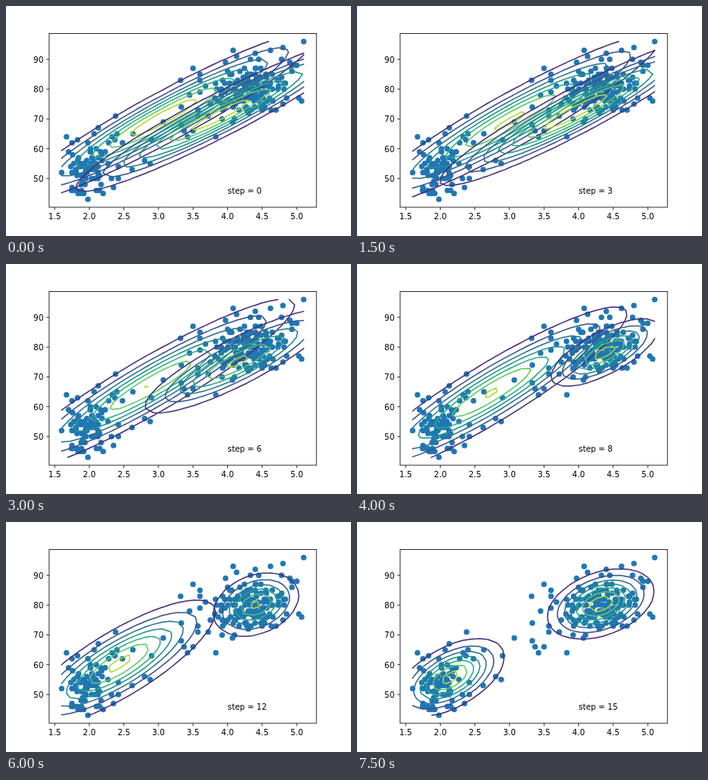
Animation of 432 by 288 pixels, one loop 8 s. Source, as an HTML page:

```html
<!DOCTYPE html>
<html lang="en">
<head>
<meta charset="utf-8">
<title>Mixture fit</title>
<style>
  html, body { margin: 0; width: 100%; height: 100%; overflow: hidden; background: #fff; }
  svg { display: block; width: 432px; height: 288px; }
  text { font: 10px "DejaVu Sans", sans-serif; fill: #000; }
  .dots { fill: #1f77b4; }
  .lines { fill: none; stroke-width: 1.5; stroke-linecap: round; stroke-linejoin: round; }
  .axes { fill: none; stroke: #000; stroke-width: .8; }
</style>
</head>
<body>
<svg viewBox="0 0 432 288">
  <g class="dots"></g>
  <g class="lines"></g>
  <g class="axes"><rect x="54" y="34.56" width="334.8" height="217.44"/></g>
  <g class="labels"></g>
</svg>
<script>
const STEPS = 16, STEP_MS = 500, GRID = 30;
const X0 = 1.6, X1 = 5.1, Y0 = 43, Y1 = 96;
const px = x => 61 + (x - 1.5) * 86.6;
const py = y => 216 - (y - 50) * 3.73;

const $ = s => document.querySelector(s);
function add(parent, tag, attrs, text) {
  const el = document.createElementNS('http://www.w3.org/2000/svg', tag);
  for (const k in attrs) el.setAttribute(k, attrs[k]);
  if (text !== undefined) el.textContent = text;
  parent.appendChild(el);
  return el;
}

// Axes
const axes = $('.axes'), labels = $('.labels');
for (let v = 1.5; v <= 5; v += 0.5) {
  add(axes, 'path', { d: `M${px(v)} 252v3.5` });
  add(labels, 'text', { x: px(v), y: 266.6, 'text-anchor': 'middle' }, v.toFixed(1));
}
for (let v = 50; v <= 90; v += 10) {
  add(axes, 'path', { d: `M54 ${py(v)}h-3.5` });
  add(labels, 'text', { x: 47, y: py(v) + 3.8, 'text-anchor': 'end' }, v);
}
const caption = add(labels, 'text', { x: px(4), y: py(45) }, '');

// Outlying points by hand, dense cores from a seeded generator
const outer = [
  [1.6,52],[1.67,64],[1.7,59],[1.75,47],[1.75,62],[1.82,46],[1.83,63],[1.92,45],[1.98,43],[2.15,46],
  [2.2,45],[2.35,47],[2.17,48],[2.32,50],[2.42,50],[2.42,54],[2.62,53],[2.8,56],[2.88,55],[2.9,63],
  [2.63,65],[2.48,62],[2.4,65],[2.37,63],[2.33,64],[2.38,71],[2.13,67],[2.07,65],[1.98,62],[2.28,62],
  [2.27,55],[2.23,59],[3.07,69],[3.33,74],[3.32,83],[3.33,68],[3.37,66],[3.42,64],[3.5,66],[3.45,78],
  [3.5,87],[3.6,85],[3.6,83],[3.6,79],[3.57,73],[3.57,71],[3.72,71],[3.83,64],[3.68,81],[3.75,75],
  [3.92,70],[4.07,69],[4.1,70],[4.3,72],[4.5,73],[4.7,73],[4.8,75],[5.07,76],[5.03,77],[5.1,96],
  [5,88],[4.93,88],[4.9,89],[4.8,94],[4.62,93],[4.4,92],[4.33,90],[4.45,90],[4.08,93],[4.13,91],
  [3.97,89],[4,86],[4.78,90],[4.93,86]
];
let seed = 11;
function rnd() {
  seed = (seed * 16807) % 2147483647;
  return seed / 2147483647;
}
const gauss = () => Math.sqrt(-2 * Math.log(rnd())) * Math.cos(2 * Math.PI * rnd());
function core(count, mx, sx, my, sy, slope, [xa, xb, ya, yb]) {
  const out = [];
  while (out.length < count) {
    const x = mx + sx * gauss();
    const y = Math.round(my + slope * (x - mx) + sy * gauss());
    if (x > xa && x < xb && y >= ya && y <= yb) out.push([x, y]);
  }
  return out;
}
const points = [
  ...outer,
  ...core(62, 1.95, 0.15, 53.5, 4.6, 6, [1.73, 2.27, 45, 61]),
  ...core(125, 4.34, 0.3, 79.6, 4.3, 3, [3.73, 4.92, 73, 88])
];
for (const [x, y] of points) add($('.dots'), 'circle', { cx: px(x), cy: py(y), r: 3.5 });

// Two components at key steps: mean x, mean y, spread in x, ridge slope, spread about the ridge
const keys = [0, 3, 5, 8, 10, 12, 15];
const low = [
  [3.07, 70.4, 1.1, 12.3, 4.64],
  [3.01, 69.3, 1.09, 12.6, 5.05],
  [2.97, 68.5, 1.08, 12.7, 5.2],
  [2.74, 64.8, 0.99, 13.5, 5.64],
  [2.56, 62.1, 0.884, 13.3, 5.8],
  [2.43, 60.3, 0.7, 12.5, 6.25],
  [2.14, 55.7, 0.39, 9, 5.5]
];
const high = [
  [3.9, 71.4, 1.04, 11.7, 3.97],
  [3.96, 72.5, 0.97, 11.9, 4.15],
  [4.05, 73.8, 0.86, 11.5, 4.7],
  [4.38, 78.2, 0.4, 10.5, 4.06],
  [4.41, 79.8, 0.33, 5.5, 5.1],
  [4.41, 80.2, 0.32, 5, 5.3],
  [4.32, 80.4, 0.378, 5.6, 5.4]
];
function paramsAt(table, step) {
  let i = 0;
  while (i < keys.length - 2 && step > keys[i + 1]) i++;
  const u = (step - keys[i]) / (keys[i + 1] - keys[i]);
  return table[i].map((a, k) => a + (table[i + 1][k] - a) * u);
}

const viridis = ['440154', '472d7b', '3b528b', '2c728e', '21918c', '28ae80', '5ec962', 'addc30', 'fde725']
  .map(h => [0, 2, 4].map(i => parseInt(h.slice(i, i + 2), 16)));
function colour(t) {
  const i = Math.min(7, Math.floor(t * 8)), u = t * 8 - i;
  return `rgb(${viridis[i].map((a, k) => Math.round(a + (viridis[i + 1][k] - a) * u))})`;
}

function niceStep(raw) {
  const base = 10 ** Math.floor(Math.log10(raw));
  return base * [1, 1.5, 2, 2.5, 3, 4, 5, 6, 8, 10].find(m => m * base >= raw);
}

const gx = i => X0 + (X1 - X0) * i / (GRID - 1);
const gy = j => Y0 + (Y1 - Y0) * j / (GRID - 1);

// Marching squares over the grid for one level
function trace(z, level) {
  let d = '';
  for (let j = 0; j < GRID - 1; j++) {
    for (let i = 0; i < GRID - 1; i++) {
      const c = [[i, j], [i + 1, j], [i + 1, j + 1], [i, j + 1]];
      const hits = [];
      for (let k = 0; k < 4; k++) {
        const [ai, aj] = c[k], [bi, bj] = c[(k + 1) % 4];
        const a = z[aj][ai], b = z[bj][bi];
        if ((a > level) === (b > level)) continue;
        const u = (level - a) / (b - a);
        hits.push(px(gx(ai + (bi - ai) * u)).toFixed(2) + ' ' + py(gy(aj + (bj - aj) * u)).toFixed(2));
      }
      for (let k = 0; k < hits.length; k += 2) d += `M${hits[k]}L${hits[k + 1]}`;
    }
  }
  return d;
}

function contours([mx, my, sx, slope, s]) {
  const z = [];
  let top = 0;
  for (let j = 0; j < GRID; j++) {
    z.push([]);
    for (let i = 0; i < GRID; i++) {
      const dx = gx(i) - mx, dy = gy(j) - my - slope * dx;
      const v = Math.exp(-((dx / sx) ** 2 + (dy / s) ** 2) / 2) / (2 * Math.PI * sx * s);
      z[j].push(v);
      top = Math.max(top, v);
    }
  }
  const gap = niceStep(top / 8), n = Math.ceil(top / gap), out = [];
  for (let k = 1; k < n; k++) out.push({ d: trace(z, k * gap), stroke: colour(k / n) });
  return out;
}

const scenes = [];
for (let s = 0; s < STEPS; s++) {
  const g = add($('.lines'), 'g', { visibility: 'hidden' });
  for (const table of [low, high])
    for (const line of contours(paramsAt(table, s))) add(g, 'path', line);
  scenes.push(g);
}

let shown = -1;
function draw() {
  const step = Math.floor(performance.now() / STEP_MS) % STEPS;
  if (step !== shown) {
    if (shown >= 0) scenes[shown].setAttribute('visibility', 'hidden');
    scenes[step].setAttribute('visibility', 'visible');
    caption.textContent = 'step = ' + step;
    shown = step;
  }
  requestAnimationFrame(draw);
}
draw();
</script>
</body>
</html>
```
